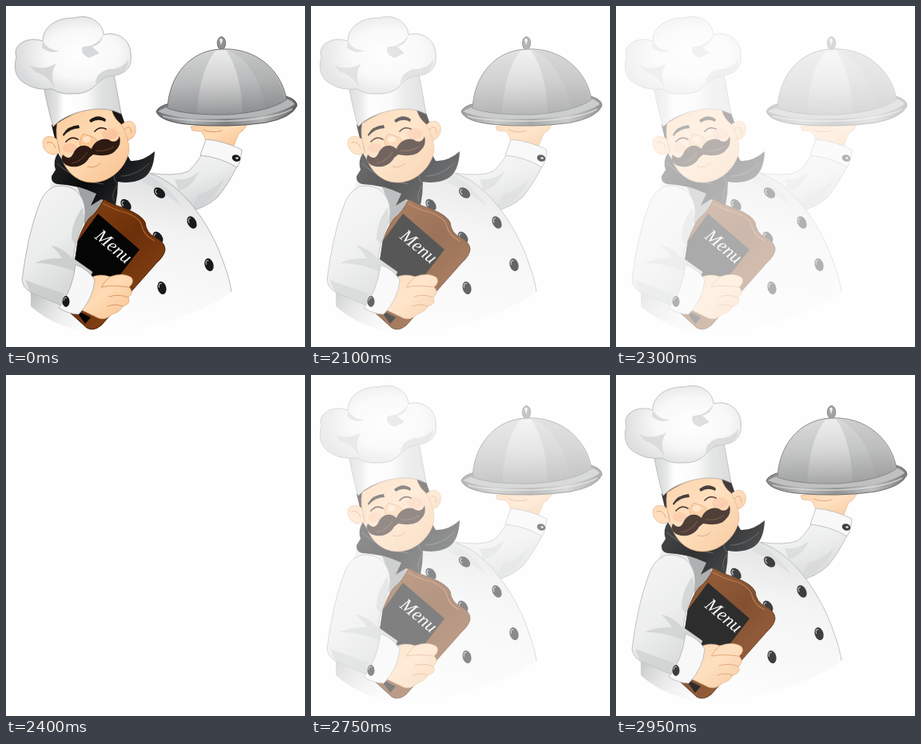
These frames come from a looping animation (374 px wide and 427 px high, 3050 ms). An HTML page:

```html
<!DOCTYPE html>
<html lang="en">
<head>
<meta charset="utf-8">
<title>Chef</title>
<style>
html, body { margin: 0; width: 100%; height: 100%; overflow: hidden; background: #fefefe; }
svg { display: block; }
.soft { fill: none; stroke: #d0d2d3; stroke-width: 1; }
.line { stroke: #a5a7a8; stroke-width: .8; }
.skin { fill: url(#skin); stroke: #d7a070; stroke-width: .6; }
.crease { fill: none; stroke: #dc9a66; stroke-width: 1; stroke-linecap: round; }
.lash { fill: none; stroke: #38201a; stroke-width: 1.7; stroke-linecap: round; }
</style>
</head>
<body>
<svg id="chef" width="374" height="427" viewBox="0 0 374 427">
<defs>
  <linearGradient id="skin" x2="1" y2="1"><stop stop-color="#fbcb9c"/><stop offset=".45" stop-color="#ffdbb4"/><stop offset="1" stop-color="#f7c08f"/></linearGradient>
  <linearGradient id="band"><stop stop-color="#c9cbcc"/><stop offset=".18" stop-color="#e3e4e4"/><stop offset=".27" stop-color="#fff"/><stop offset=".55" stop-color="#fafafa"/><stop offset=".75" stop-color="#e0e1e1"/><stop offset="1" stop-color="#d5d6d7"/></linearGradient>
  <radialGradient id="puff" cx=".58" cy=".48" r=".58"><stop stop-color="#fff"/><stop offset=".55" stop-color="#f8f8f8"/><stop offset="1" stop-color="#d9dadb"/></radialGradient>
  <linearGradient id="dome" x1=".4" x2=".5" y2="1"><stop stop-color="#d3d4d4"/><stop offset=".5" stop-color="#b9babb"/><stop offset="1" stop-color="#8c8d8e"/></linearGradient>
  <linearGradient id="shine" x2="0" y2="1"><stop stop-color="#fff" stop-opacity=".55"/><stop offset=".6" stop-color="#fff" stop-opacity=".25"/><stop offset="1" stop-color="#fff" stop-opacity=".05"/></linearGradient>
  <linearGradient id="tray"><stop stop-color="#6c6d6f"/><stop offset=".25" stop-color="#aeafb0"/><stop offset=".5" stop-color="#7e7f80"/><stop offset=".75" stop-color="#b2b3b4"/><stop offset="1" stop-color="#606163"/></linearGradient>
  <linearGradient id="coat" x1=".75" y1="0" x2=".45" y2="1"><stop stop-color="#dcddde"/><stop offset=".35" stop-color="#f3f3f3"/><stop offset="1" stop-color="#fefefe"/></linearGradient>
  <linearGradient id="hem" x2="1" y2=".4"><stop stop-color="#b5b7b8"/><stop offset="1" stop-color="#fefefe" stop-opacity="0"/></linearGradient>
  <linearGradient id="sleeve" x2=".5" y2="1"><stop stop-color="#f6f6f6"/><stop offset=".55" stop-color="#ebecec"/><stop offset="1" stop-color="#d2d4d5"/></linearGradient>
  <linearGradient id="wood" x2=".7" y2="1"><stop stop-color="#8a4513"/><stop offset=".5" stop-color="#6b2f0a"/><stop offset="1" stop-color="#8c4717"/></linearGradient>
  <linearGradient id="scarf" x2="1" y2=".4"><stop stop-color="#26282a"/><stop offset=".5" stop-color="#08090a"/><stop offset="1" stop-color="#2a2c2e"/></linearGradient>
  <g id="button"><ellipse rx="5.4" ry="8.2" fill="#17191b"/><path d="M-3.2-1C-3.5-5-1-7 1-5" fill="none" stroke="#a3a5a7" stroke-width="1.3"/></g>
</defs>

<!-- raised arm and hand -->
<path class="skin" d="M231 151Q265 142 302 148Q297 157 291 160L284 177L250 169Q249 163 244 157L233 156Z"/>
<path class="crease" d="M247 155Q258 160 270 156"/>
<path class="line" fill="url(#sleeve)" d="M178 209Q213 214 228 207Q239 197 247 182L291 197Q279 222 265 239Q250 253 229 257L190 250Z"/>
<path fill="#d0d2d3" opacity=".75" d="M211 217Q229 219 242 207Q232 228 216 231ZM240 235Q257 233 273 216Q260 246 231 256Z"/>
<path class="line" fill="#f8f8f8" d="M250 167Q273 169 295 180Q294 194 289 202Q267 189 243 187Z"/>
<ellipse cx="288" cy="190.5" rx="5.4" ry="4.2" fill="#17191b" transform="rotate(20 288 190.5)"/>
<ellipse cx="289" cy="190.5" rx="1.8" ry="1.3" fill="#ddd"/>

<!-- cloche -->
<ellipse cx="269.5" cy="46.5" rx="5.2" ry="8" fill="#8f9091" stroke="#5e6062" stroke-width=".8"/>
<path d="M267 42Q270 39 271 43L269 49Z" fill="#eee"/>
<path d="M188 132Q191 125 205 122L350 113Q364 117 364 125Q357 140 325 146Q278 153 225 148Q192 144 188 132Z" fill="url(#tray)" stroke="#4e5052" stroke-width="1"/>
<path d="M190 132Q198 127 207 126L350 116Q359 119 361 123Q340 138 280 141Q214 143 190 132Z" fill="#b4b5b6"/>
<path d="M202 128C204 87 230 56 268 54C314 51 345 82 351 117Q331 132 278 136Q226 137 202 128Z" fill="url(#dome)" stroke="#6a6c6e" stroke-width=".9"/>
<path d="M262 56Q242 81 239 135Q267 138 296 134Q294 82 275 55Z" fill="url(#shine)"/>
<path d="M279 56Q313 71 325 127Q341 123 348 117C340 78 315 56 279 56Z" fill="#777" opacity=".13"/>
<path d="M196 138Q223 145 277 144Q335 142 358 129" fill="none" stroke="#ddd" stroke-width="1.6" opacity=".7"/>

<!-- coat -->
<path fill="url(#coat)" d="M58 215L181 210C221 222 258 277 273 324Q280 343 282 358Q226 398 116 413Q64 407 30 376L34 300Z"/>
<path class="line" fill="none" d="M181 210C221 222 258 277 273 324Q280 343 282 358"/>
<path fill="#d4d6d7" opacity=".7" d="M177 211Q207 228 220 251Q202 236 170 220Z"/>
<path fill="#9fa1a2" d="M88 225L122 232L118 252L98 276Q98 244 88 225Z"/>
<path fill="url(#hem)" d="M31 350L98 384L140 408L116 412Q62 404 31 376Z"/>
<use href="#button" transform="translate(150 249) rotate(-40)"/>
<use href="#button" transform="translate(192 234) rotate(-50)"/>
<use href="#button" transform="translate(232.5 271) rotate(-28)"/>
<use href="#button" transform="translate(190 290) rotate(-35)"/>
<use href="#button" transform="translate(254 324) rotate(-18)"/>
<use href="#button" transform="translate(195 353) rotate(-14)"/>

<!-- scarf -->
<path fill="url(#scarf)" d="M65 184Q58 194 62 205L57 213Q56 221 64 223Q90 224 113 235L106 250L119 242L137 250Q140 235 140 220Q158 223 171 216Q185 208 186 182Q171 195 156 194L152 187Q125 213 106 217Q79 211 65 184Z"/>
<path d="M64 197Q84 217 122 223M143 213Q162 213 179 197M139 224Q131 237 135 244M137 206Q132 214 139 222" fill="none" stroke="#404345" stroke-width="1.2"/>

<!-- face -->
<path fill="#1c1715" d="M57 149Q95 124 143 131L150 151L145 160L131 140L68 150L66 184L61 166Z"/>
<path class="skin" d="M64 167C51 158 42 167 48 179Q55 190 67 184ZM144 149C156 138 166 148 161 161Q157 169 146 169Z"/>
<path class="crease" d="M51 171Q59 168 62 178M148 155Q156 146 157 159"/>
<path class="skin" d="M67 180Q61 162 64 147Q83 134 103 130Q118 128 132 130Q135 141 144 148Q154 165 154 181C151 201 132 220 110 221C86 222 70 202 67 180Z"/>
<g fill="#f59e7d" opacity=".28"><ellipse cx="80" cy="178" rx="9" ry="6"/><ellipse cx="130" cy="160" rx="10" ry="7"/></g>
<path fill="#211916" d="M71 161Q77 150 91 149L92 153Q80 153 72 163ZM104 143Q115 134 125 142L124 145Q115 140 106 146Z"/>
<path class="lash" d="M75 170Q82 162 90 167M111 157Q117 150 125 154"/>
<path fill="#fdc997" stroke="#e0a06c" stroke-width=".8" d="M97 160C91 165 90 177 98 179Q107 181 113 174Q116 165 106 163Z"/>
<ellipse cx="101" cy="167" rx="5" ry="4" fill="#ffe2c3"/>
<path fill="#2d1a12" d="M107 179C99 171 89 175 85 183C82 190 78 193 71 186Q67 194 75 199C85 204 98 201 104 190L109 186C119 188 131 188 137 181Q145 174 142 163Q139 172 131 169C123 163 110 169 107 179Z"/>
<path d="M82 197Q94 195 102 183M112 181Q124 183 135 176" fill="none" stroke="#5f3a22" stroke-width="1.2"/>
<path class="crease" d="M102 201Q111 204 118 197"/>

<!-- hat -->
<path class="line" fill="url(#band)" d="M46 94L134 80Q139 107 144 135Q125 125 98 131Q73 136 59 151Q52 128 46 94Z"/>
<path class="line" fill="url(#puff)" d="M46 44C46 25 65 14 85 15C105 9 121 21 122 36C140 31 156 43 156 60C158 77 149 85 135 87Q121 88 113 98Q103 111 82 110Q68 111 58 104Q37 106 24 97C12 91 9 77 13 64C7 48 28 37 46 44Z"/>
<path fill="#cfd0d1" opacity=".8" d="M46 44Q53 56 67 56Q56 61 45 52ZM122 36Q119 49 108 51L117 59L104 65Q92 60 96 51Q113 51 122 36ZM29 74Q45 82 63 72Q54 84 61 103Q51 86 37 83ZM112 97Q112 84 128 79Q145 80 153 67Q153 84 135 87Q121 88 112 97Z"/>

<!-- menu board -->
<path fill="url(#wood)" stroke="#4d2106" stroke-width="1" d="M122 242Q133 249 150 254Q170 262 174 271Q175 284 187 290Q199 296 199 305Q198 313 189 321L119 400Q109 408 101 403L78 382L90 294Q96 276 104 266Q115 258 122 242Z"/>
<path d="M121 247Q134 255 151 259Q168 266 170 276Q173 288 186 294" fill="none" stroke="#a8622f" stroke-width="1.2"/>
<path fill="#050505" d="M115 260L167 305L140 340L130 367L84 330L90 294ZM86 380L106 390L99 398Z"/>
<text transform="translate(110 290) rotate(40)" font-family="'Liberation Serif', 'Noto Serif', serif" font-style="italic" font-size="23" fill="#fff">Menu</text>

<!-- lower arm and hand -->
<path class="line" fill="url(#sleeve)" d="M61 226Q46 232 40 253Q27 288 20 343Q21 352 30 358L86 382L108 333L84 316Q87 293 98 268C103 242 88 221 61 226Z"/>
<path fill="#c6c8c9" opacity=".75" d="M83 316Q69 301 56 300Q65 307 70 316Q49 315 36 322Q61 321 94 336L108 334ZM96 252Q82 270 82 292L87 299L98 267ZM24 343Q47 352 72 360L68 374L30 358Z"/>
<path class="skin" d="M104 341Q117 334 130 339Q146 333 157 340Q161 346 154 352Q161 359 153 365Q157 373 146 376Q143 383 133 386Q125 394 116 391L91 379Z"/>
<path class="crease" d="M130 339Q123 345 119 352Q134 349 153 352M129 364Q141 360 153 365M127 376Q137 372 146 376"/>
<path class="line" fill="#f7f7f7" d="M87 324Q102 329 111 343Q109 367 91 386Q78 386 66 378Q83 357 87 324Z"/>
<use href="#button" transform="translate(75 370) scale(.84)"/>
</svg>
<script>
const chef = document.getElementById("chef");
const LOOP = 3050, STEP = 100;

// The fade moves in sixths, once every STEP.
function opacityAt(t) {
  if (t < 2000) return 1;
  if (t < 2400) return (5 - Math.floor((t - 2000) / STEP)) / 6;
  if (t < 2650) return 0;
  return (2 + Math.floor((t - 2650) / STEP)) / 6;
}

function draw() {
  chef.style.opacity = opacityAt(performance.now() % LOOP);
  requestAnimationFrame(draw);
}
draw();
</script>
</body>
</html>
```
